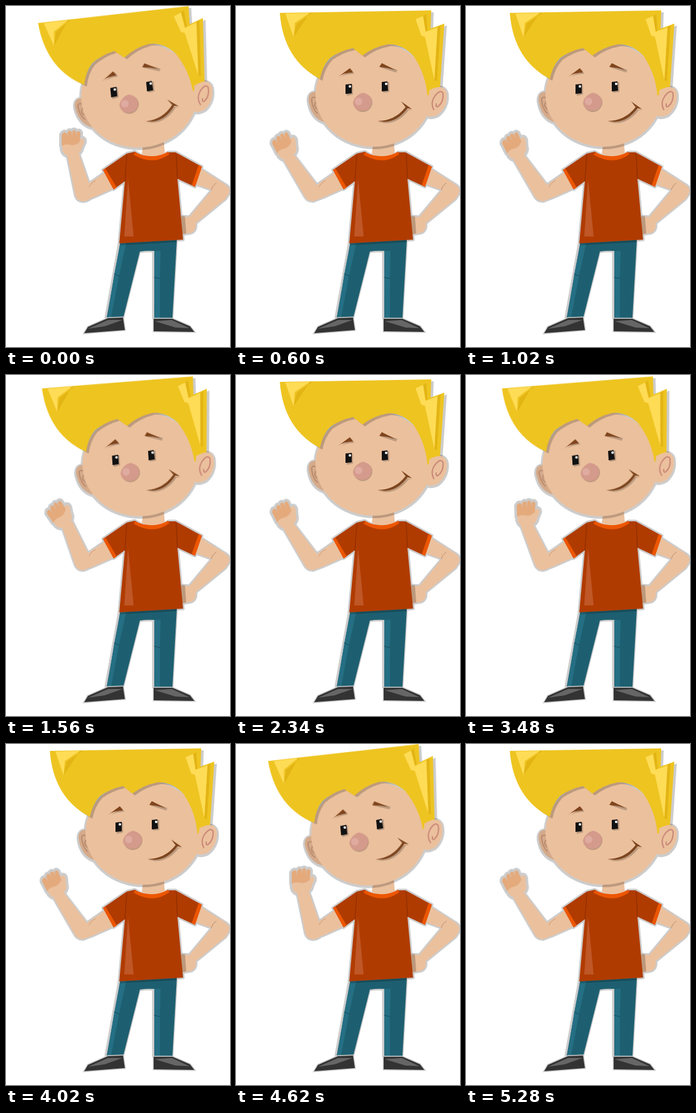
These frames come from a looping animation (358x543 px, 5400 ms). An HTML page:

```html
<!DOCTYPE html>
<html lang="en">
<head>
<meta charset="utf-8">
<title>Waving boy</title>
<style>
  html, body { margin: 0; width: 100%; height: 100%; overflow: hidden; background: #fff; }
  svg { display: block; width: 358px; height: 543px; }
  .head { transform-origin: 230px 216px; }
  .fore { transform-origin: 120px 304px; }
  .rim { stroke: #ccc; stroke-width: 5; stroke-linejoin: round; }
  .skin { fill: #ebc09d; }
  .shade { fill: #000; fill-opacity: .2; }
  .line { fill: none; stroke-linecap: round; }
</style>
</head>
<body>
<svg viewBox="0 0 358 543">
  <defs>
    <path id="hipArm" class="skin" d="M311 259L350 284Q360 290 356 299L351 307L303 346Q305 356 297 361L280 364V335L293 336L329 293L301 283Z"/>
    <path id="upperArm" class="skin" d="M158 265L132 283L116 297L123 311L139 305L173 290Z"/>
    <path id="fore" class="skin" d="M97 234L111 302Q114 311 123 311Q135 310 138 302L134 286L115 231Z"/>
    <g id="hand">
      <path class="skin" d="M-16 -15L-16 -5Q-14 3 -7 4L8 2Q14 -1 15 -8L19 -17Q20 -24 14 -23L8 -14Z"/>
      <path fill="#e4aa7c" d="M-17 -13L-17 -29Q-13 -36 -9 -31L-8 -25L-8 -32Q-5 -38 -1 -34L-1 -26L0 -34Q3 -39 6 -34L6 -26L7 -33Q11 -37 13 -32L12 -18Q6 -11 -4 -13Q-12 -15 -17 -11Z"/>
    </g>
    <path id="pants" fill="#1d5f70" d="M183 374L161 496L187 498L214 391Q226 389 237 390V497H266L273 372Z"/>
    <path id="shirt" fill="#b03b00" d="M193 235L206 232Q236 252 259 233L271 233L313 256L302 288L274 275L283 372L181 378L190 279L172 292L155 261Z"/>
    <ellipse id="face" class="skin" cx="220" cy="141" rx="93" ry="83"/>
    <path id="earL" d="M132 137Q115 134 116 151Q120 178 141 185Z"/>
    <path id="earR" class="skin" d="M309 134Q333 122 337 139Q339 160 323 173Q313 178 305 175Z"/>
    <path id="hair" d="M70 11L312 7L311 36L333 28L326 130L306 143Q303 108 284 80Q266 60 243 61Q220 65 202 79L187 67Q167 71 150 83Q138 96 134 116Q76 86 70 11Z"/>
  </defs>

  <g class="rim">
    <use href="#hipArm"/><use href="#upperArm"/><use href="#shirt"/>
    <use href="#pants" transform="translate(-1 0)"/>
    <g class="fore"><use href="#fore"/></g>
    <g class="hand" stroke-width="8"><use href="#hand"/></g>
  </g>

  <use href="#hipArm"/>
  <path class="shade" d="M280 334L286 335L288 362L281 364Z"/>
  <path class="line" stroke="#b98d6d" d="M336 282Q330 286 328 293"/>
  <use href="#upperArm"/>
  <g class="fore"><use href="#fore"/></g>
  <path class="line" stroke="#c99b79" d="M133 288Q136 281 143 278"/>
  <g class="hand"><use href="#hand"/></g>

  <use href="#pants"/>
  <path fill="#256f84" d="M183 378H192L181 428L168 496H162L173 427ZM237 390H247L246 433V497H238Z"/>
  <path class="line" stroke="#174c5b" d="M173 427L181 430M237 432L246 434"/>
  <path class="shade" d="M183 378L273 373V376L182 381Z"/>
  <g stroke="#ccc" stroke-width="3" paint-order="stroke" fill="#333">
    <path d="M125 521L131 511L163 497L187 496L190 516Z"/>
    <path d="M236 518V498H266L294 510L301 519Z"/>
  </g>
  <path fill="#666" d="M131 514L163 500L186 500L158 510ZM238 502L265 500L293 513L271 512Z"/>

  <path class="skin" d="M220 214H252L254 235Q236 247 217 235Z"/>
  <use href="#shirt"/>
  <path fill="#bf5727" d="M195 275L189 367L204 367Z"/>
  <g fill="#ed5600">
    <path d="M206 233Q236 246 259 232L261 236Q236 255 204 237Z"/>
    <path d="M155 261L159 259L177 289L172 292ZM313 256L308 253L297 285L302 288Z"/>
  </g>
  <path class="line" stroke="#862c00" d="M193 238L190 279M272 236L274 275"/>

  <g class="head">
    <g opacity=".2" stroke="#000" stroke-width="6" transform="translate(0 1)">
      <use href="#earL"/><use href="#earR"/><use href="#face"/>
    </g>
    <use href="#earL" fill="#d4aa8a"/>
    <path class="line" stroke="#b38268" stroke-width="1.5" d="M128 146Q120 143 121 151Q123 165 130 171M128 153Q123 158 129 164"/>
    <use href="#face"/>
    <use href="#hair" class="shade" transform="translate(4 3)"/>
    <use href="#hair" fill="#eec421"/>
    <path fill="#e2b414" d="M299 16L304 13L306 39L303 41ZM322 34L327 31L321 120L317 118ZM118 11L122 11L97 28L92 50Z"/>
    <path fill="#ffdc56" d="M79 12L118 11L94 27L92 50ZM287 21L299 16L303 41L322 34L317 118L302 49L296 47Z"/>
    <use href="#earR"/>
    <path class="line" stroke="#c98777" stroke-width="2" d="M316 165Q310 154 318 143Q327 132 331 139Q332 153 323 160Q319 162 320 156"/>

    <path class="shade" d="M165 115L185 101L189 108Q174 108 165 115ZM231 98L235 93L258 102L256 106Z"/>
    <path fill="#80451d" d="M163 113L182 99L187 106Q172 106 163 113ZM229 97L233 91L255 102Q242 98 229 97Z"/>
    <path class="shade" d="M177 126L187 125V141L177 143ZM234 122L245 121V137L235 138Z"/>
    <path fill="#111" d="M175 125L185 124V139L175 140ZM233 121L242 120L243 135L233 136Z"/>
    <g fill="#fff"><circle cx="182" cy="128" r="2"/><circle cx="240" cy="124" r="2"/></g>
    <path class="shade" d="M204 140Q219 142 218 156Q214 169 201 169Q188 166 189 154Z"/>
    <path fill="#d49a8b" d="M203 138Q217 141 217 154Q214 167 201 167Q187 165 187 153Q191 141 203 138Z"/>
    <circle cx="196" cy="152" r="6" fill="#dfaaa0"/>
    <path class="shade" d="M228 185Q255 185 272 164L283 166L276 166Q256 192 228 185Z"/>
    <path fill="#7d461f" d="M226 183Q254 183 271 161L264 152L281 164L274 163Q254 190 226 183Z"/>
  </g>
</svg>
<script>
  // Four poses of the wave: right, leaving right, left, leaving left.
  const poses = {
    head: [-5.45, -3.6, 0, -3.6].map(a => `rotate(${a}deg)`),
    fore: [0, -8.5, -18.5, -7.5].map(a => `rotate(${a}deg)`),
    hand: [[106, 234, 0], [99, 236.5, -2], [86, 237, -27], [96, 235, -35]]
      .map(([x, y, a]) => `translate(${x}px, ${y}px) rotate(${a}deg)`)
  };

  // Each run is a number of long holds followed by one short hold.
  const tick = 60, loop = 5400;
  const runs = [2, 2, 2, 3, 5, 3, 2, 2, 7, 2, 2, 2];
  const holds = runs.flatMap(n => [...Array(n).fill(2), 1]).concat(Array(5).fill(2));

  const starts = [];
  holds.reduce((t, h) => (starts.push(t), t + h * tick), 0);

  for (const [part, list] of Object.entries(poses)) {
    const frames = starts.map((t, i) => ({
      offset: t / loop, transform: list[i % 4], easing: 'step-end'
    }));
    frames.push({ offset: 1, transform: list[0] });
    for (const el of document.querySelectorAll('.' + part)) {
      el.animate(frames, { duration: loop, iterations: Infinity }).startTime = 0;
    }
  }
</script>
</body>
</html>
```
